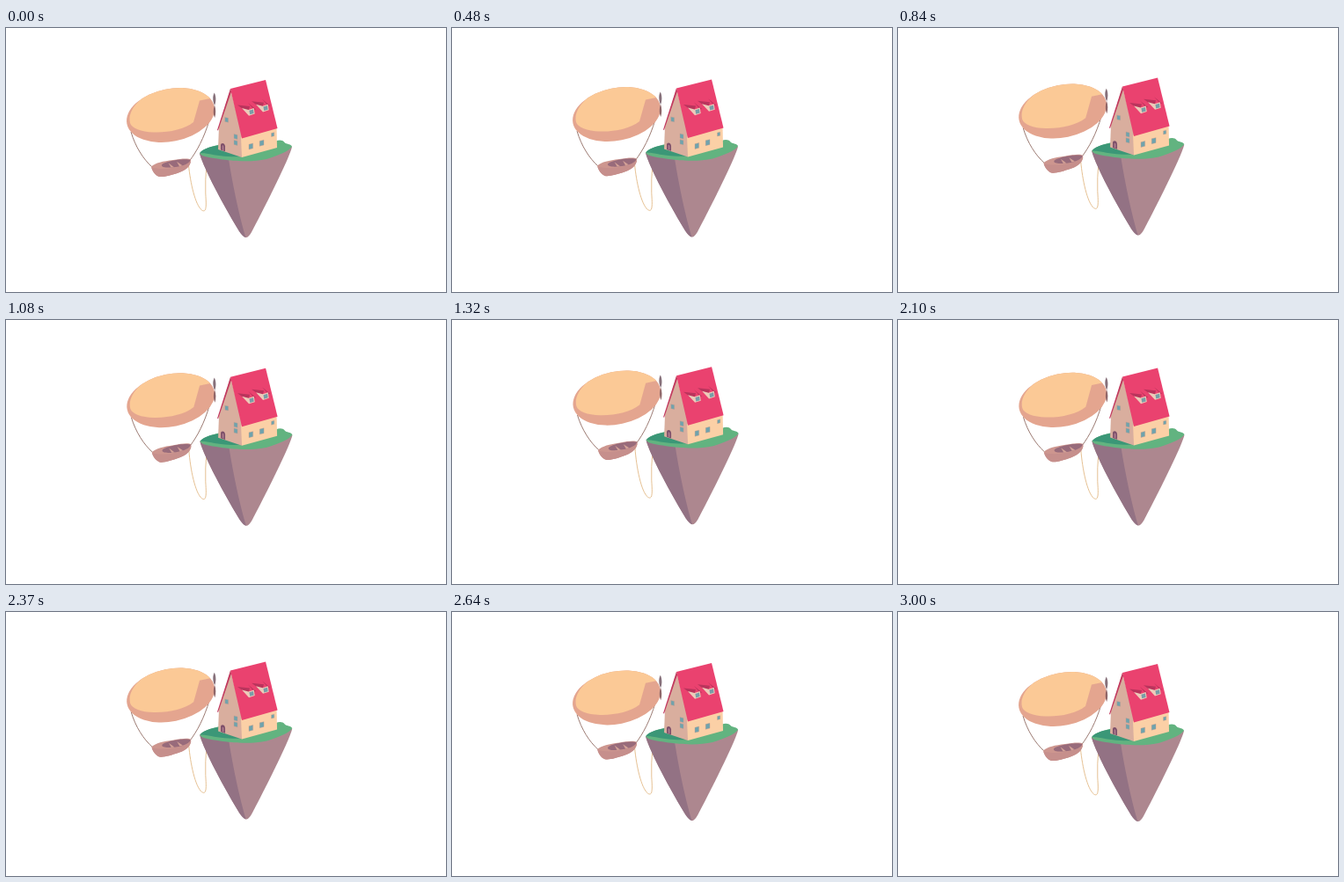
Write an HTML page with a canvas that moves like this. It is 500x300 px and loops after 3.03 s.

```html
<!DOCTYPE html>
<html lang="en">
<head>
<meta charset="utf-8">
<title>Floating house</title>
<style>
html, body { margin: 0; width: 100%; height: 100%; overflow: hidden; background: #fff; }
canvas { display: block; width: 500px; height: 300px; }
</style>
</head>
<body>
<canvas id="stage"></canvas>
<script>
const LOOP = 3030, PEAK = 1605;
const canvas = document.getElementById('stage');
const ctx = canvas.getContext('2d');
const dpr = window.devicePixelRatio || 1;
canvas.width = 500 * dpr;
canvas.height = 300 * dpr;

const paths = {};
function shape(d) {
  return paths[d] || (paths[d] = new Path2D(d));
}
function fill(color, d) {
  ctx.fillStyle = color;
  ctx.fill(shape(d));
}
function stroke(color, width, d) {
  ctx.strokeStyle = color;
  ctx.lineWidth = width;
  ctx.stroke(shape(d));
}

// 0 at the lowest point, 1 at the highest
function lift(t) {
  const s = (1 + Math.cos((t - PEAK) / LOOP * 2 * Math.PI)) / 2;
  return Math.pow(s, 1.35);
}

// Slanted window: corner, width, height, rise of the top edge
function pane(x, y, w, h, rise) {
  const box = 'M' + x + ' ' + y + 'l' + w + ' ' + -rise + 'v' + h + 'l' + -w + ' ' + rise + 'z';
  fill('#6fa3ad', box);
  stroke('#c79c8e', 0.4, box);
}

function island() {
  fill('#ad878f', 'M220 142L325 135C323 145 301 190 279 232Q275 239 272 238Q269 237 265 231C242 193 222 153 220 142Z');
  fill('#937284', 'M220 142L253 149C258 181 266 217 272.5 238Q269 237 265 231C242 193 222 153 220 142Z');
  fill('#62b380', 'M220 142C224 137 235 134 245 132L306 129C310 127 314 127 316.5 130C318.5 132.5 323 131 325 134.5C322 140 309 145 296 149C279 153 256 151 243 149C231 147 221 146 220 142Z');
  fill('#3b9777', 'M220.5 141.5C226 136 235 134 245 133L267 146C256 147 239 145 230 143C225 142 222 143 220.5 141.5Z');
}

function dormer(x, y) {
  ctx.save();
  ctx.translate(x, y);
  fill('#b9345c', 'M0 0L14 1.5L12.5 6.5L5.5 4Z');
  fill('#b9345c', 'M12 -2.5L21 5L18.8 5.2Z');
  fill('#eecbb9', 'M5 3.5L12.5 5.5L18.7 3.5L19.7 10L13 12.2Z');
  fill('#789ea8', 'M13.4 6.3L18 5L18.6 9.5L14.2 10.8Z');
  ctx.restore();
}

function house() {
  fill('#d9ae9e', 'M255 69L269 124L268 147L241 138L242 112Z');
  fill('#fbd0a6', 'M267 124L307.5 112L308 136L268 147Z');
  fill('#ea426f', 'M255 69L295 59L308.5 114L268 125.5Z');
  fill('#c23a60', 'M255 69L256 72.5L241 116.5L240 116Z');
  dormer(263, 87.5);
  dormer(279, 83.2);
  pane(248.8, 101.5, 3.8, 5, -0.8);
  pane(259, 120.5, 4, 5, -1);
  pane(259, 127.4, 4, 5, -1);
  pane(276, 132.2, 4.6, 5.8, 1.2);
  pane(288.2, 128.4, 4.8, 5.8, 1.2);
  pane(301.5, 119.5, 3.2, 4, 0.8);
  fill('#7b4e69', 'M244 138.6V133C244 130 248.6 130 249 134.5V140.3Z');
  fill('#a9778a', 'M245.5 138.4V134C246 132.6 247.2 133 247.6 135V139.2Z');
}

function envelope() {
  ctx.save();
  ctx.fillStyle = '#e4a58f';
  ctx.beginPath();
  ctx.ellipse(187, 99, 50.6, 29.9, -0.2, 0, 2 * Math.PI);
  ctx.fill();
  ctx.clip();
  fill('#fbc996', 'M141 108C137 92 157 72 184 67C207 63 229 67 234.5 79.5L220 82.5L213 107C203 115 185 119 168 118.5C153 118 143 114 141 108Z');
  ctx.restore();
}

function propeller() {
  fill('#86707a', 'M237 88C234.3 82 235 76.5 236.8 73.5C238.9 78 238.8 84 237 88Z');
  fill('#8f6668', 'M237 87.5C235.2 93 235.4 98.5 237.2 102C238.6 97.5 238.6 92 237 87.5Z');
}

function boat() {
  fill('#cd968f', 'M165 157.5C170 153 178 151.5 190 150C199 148.5 208 147.5 210 150C210 156 206 161 196 164.5C187 167.5 178 170 173.5 168.8C169 167 166 162 165 157.5Z');
  fill('#c68f8c', 'M165.3 158.5C177 161.5 198 160.5 210 151.5C209 157 205 161.5 196 164.5C187 167.5 178 170 173.5 168.8C169 167 166 162 165.3 158.5Z');
  fill('#986b7b', 'M177 155.5C179 151.5 203 147.5 209.3 150C209.5 153.5 201 157 193 158C185 159 176 159 177 155.5Z');
  fill('#d3a196', 'M184.5 153.2L191 158.2L187.5 158.5ZM194 151.8L200.5 156.2L197 157.2Z');
}

function rigging() {
  stroke('#906b62', 0.9, 'M142 118C147 135 156 149 166 158M231 105C225 125 217 140 208.5 151');
}

function tether(p) {
  const a = -12 * p, b = -6.5 * p;
  ctx.strokeStyle = '#e2b986';
  ctx.lineWidth = 0.9;
  ctx.beginPath();
  ctx.moveTo(207.5 + p * 0.5, 156 + a);
  ctx.bezierCurveTo(209.5, 176 + a * 0.8, 215, 201 + b, 222.5, 207 + b);
  ctx.bezierCurveTo(228.5, 211 + b, 227.5, 200 + b, 226.8, 188 + b);
  ctx.quadraticCurveTo(226.3, 172 + b, 227.8, 157 + b);
  ctx.stroke();
}

function draw(now) {
  const p = lift(now % LOOP);
  ctx.setTransform(dpr, 0, 0, dpr, 0, 0);
  ctx.fillStyle = '#fff';
  ctx.fillRect(0, 0, 500, 300);

  tether(p);

  ctx.save();
  ctx.translate(0.7 * p, -6.6 * p);
  island();
  ctx.translate(-0.6 * p, 0);
  house();
  ctx.restore();

  ctx.save();
  ctx.translate(188 + 0.6 * p, 120 - 11.8 * p);
  ctx.rotate(-0.012 * p);
  ctx.translate(-188, -120);
  rigging();
  envelope();
  propeller();
  ctx.translate(188, 158);
  ctx.rotate(-0.025 * p);
  ctx.translate(-188, -158);
  boat();
  ctx.restore();
}

let start = null;
function tick(now) {
  if (start === null) start = now;
  draw(Math.max(0, now - start));
  requestAnimationFrame(tick);
}
draw(0);
requestAnimationFrame(tick);
</script>
</body>
</html>
```
